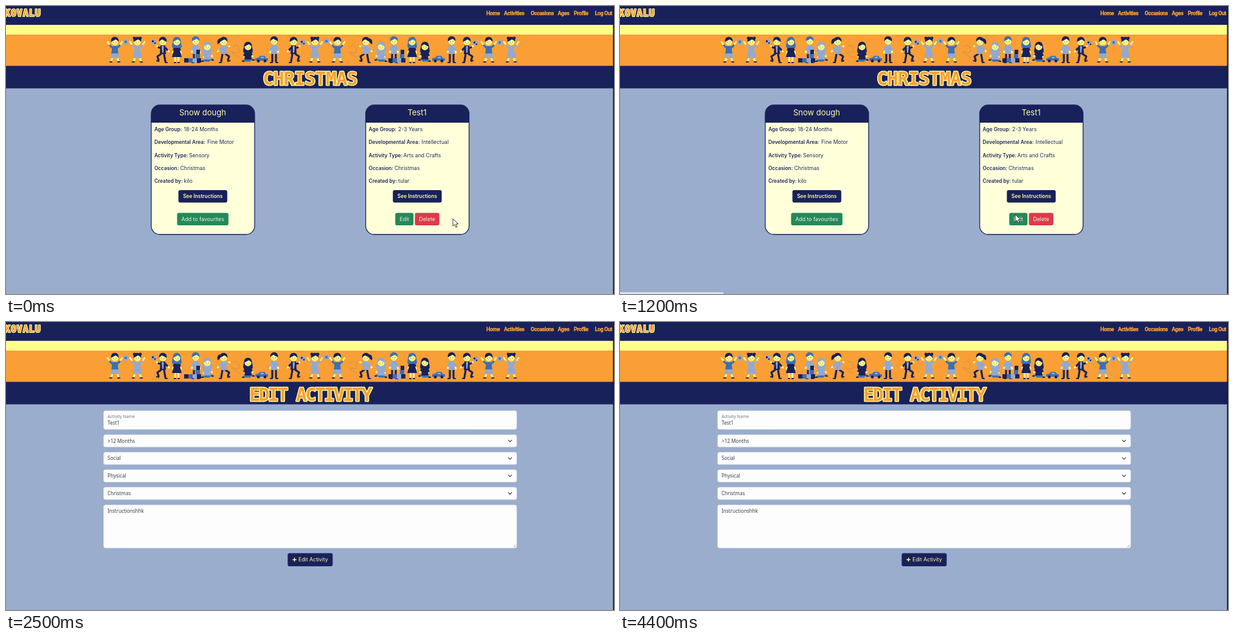
These frames come from a looping animation (1000 px wide and 474 px high, 4.5 s). An HTML page:

```html
<!DOCTYPE html>
<html lang="en">
<head>
<meta charset="utf-8">
<title>Activity editor</title>
<style>
  html, body { margin: 0; width: 100%; height: 100%; overflow: hidden; background: #9aadcd; }
  svg { display: block; width: 100vw; height: 100vh; }
  text { font-family: Inter, sans-serif; font-size: 8.7px; fill: #232a5e; white-space: pre; }
  .b { font-weight: 600; font-size: 8.3px; }
  .y { fill: #ffff9c; }
  .w { fill: #eef3df; }
  .mid { text-anchor: middle; }
  .title { font-size: 13px; }
  .nav { font: 700 8.9px Roboto, sans-serif; letter-spacing: -.4px; fill: #f99f36; stroke: #f99f36; stroke-width: .3; }
  .fancy { font: 700 30px "DejaVu Sans Mono", monospace; fill: #f99f36; stroke: #ffffa0;
    stroke-width: 3; stroke-linejoin: round; paint-order: stroke; }
  .logo { font-size: 15px; stroke-width: 2.2; letter-spacing: .9px; }
  .field { font: 8.1px "Noto Sans", sans-serif; fill: #3b4048; }
  .label { font-size: 7px; fill: #73798a; }
</style>
</head>
<body>
<svg id="stage" viewBox="0 0 1000 474" preserveAspectRatio="none"></svg>
<script>
const NAVY = '#19215b', ORANGE = '#f99f36', YELLOW = '#ffff8c', BLUE = '#3b70b4', PALE = '#91a9d4';
const GREEN = '#26885a', RED = '#dc3b4a';

const rect = (x, y, w, h, fill, r = 0, more = '') =>
  `<rect x="${x}" y="${y}" width="${w}" height="${h}" rx="${r}" fill="${fill}" ${more}/>`;
const text = (x, y, s, cls = '', more = '') => `<text x="${x}" y="${y}" class="${cls}" ${more}>${s}</text>`;
const line = (d, color, w) =>
  `<path d="${d}" fill="none" stroke="${color}" stroke-width="${w}" stroke-linecap="round" stroke-linejoin="round"/>`;
const shape = (d, fill) => `<path d="${d}" fill="${fill}"/>`;
const dot = (x, y, r, fill) => `<circle cx="${x}" cy="${y}" r="${r}" fill="${fill}"/>`;

const poses = {
  up: { arms: 'M-5 69L-12 59M5 69L12 59', sleeves: 'M-4 69L-8 65M4 69L8 65', legs: 'M-3 82L-6 91M3 82L6 91',
    shoes: 'M-8 92H-5M5 92H8', body: 'M-4 66H4L6 79H-6z', skin: true },
  kick: { arms: 'M-4 69L-10 75M4 69L10 66', sleeves: 'M-4 69L-7 72M4 69L7 68', legs: 'M-2 79L-4 91M3 79L9 83L7 89',
    shoes: 'M-7 93H-4M7 91L10 90', body: 'M-4 65H4L5 79H-5z' },
  stand: { arms: 'M-4 68L-7 76L0 75M4 68L7 77', sleeves: 'M-4 68L-6 72M4 68L6 72', legs: 'M-3 79V91M3 79V91',
    shoes: 'M-6 93H-3M3 93H6', body: 'M-4 64H4L5 79H-5z' },
  dress: { arms: 'M-3 69L-7 77M3 69L7 77', sleeves: 'M-3 68L-5 72M3 68L5 72', legs: 'M-2.5 83V91M2.5 83V91',
    shoes: 'M-4 93H-2M2 93H4', body: 'M-3 66H3L8 84H-8z', skin: true },
  sit: { arms: 'M-4 77L-6 84L0 83M4 77L8 83', sleeves: 'M-4 77L-6 81M4 77L6 80', legs: 'M-3 88H8M3 90H-7',
    shoes: 'M8 89H10M-7 91H-9', body: 'M-4 74H4L6 88H-6z' }
};

function kid(x, pose, shirt, girl, flip = 1) {
  const p = poses[pose], sit = pose === 'sit';
  const hair = pose === 'dress' || (pose === 'stand' && x < 700 && x !== 441) ? BLUE : sit && shirt === PALE ? PALE : NAVY;
  const locks = {
    up: dot(-5, 54, 2.4, hair) + dot(5, 54, 2.4, hair),
    kick: shape('M-4 54Q-12 54-10 64Q-6 62-4 58z', hair)
  };
  const long = shape('M-6 57Q-9 68-7 70H7Q9 68 6 57z', hair);
  const back = girl ? locks[pose] || long : '';
  const head = `<g transform="translate(0 ${sit ? 7 : pose === 'stand' ? -2 : -1})">${back}${dot(0, 60, 5.7, YELLOW)}` +
    shape('M-6.2 60C-8 49 8 49 6.2 60Q4 57 1 56Q-4 59-6.2 60z', hair) +
    dot(-2, 60.5, .6, NAVY) + dot(2, 60.5, .6, NAVY) + line('M-1.6 63Q0 64 1.6 63', ORANGE, .7) + '</g>';
  const shorts = pose === 'up' ? shape('M-6 78H6L7 86H2L0 82L-2 86H-7z', shirt === BLUE ? PALE : shirt) : '';
  const tie = shirt === NAVY && pose === 'kick' ? shape('M-1.5 66H2L1 77H-1z', PALE) : '';
  return `<g transform="translate(${x} 0) scale(${flip} 1)">` + line(p.legs, p.skin ? YELLOW : sit ? BLUE : NAVY, 3.2) +
    line(p.shoes, NAVY, 2.2) + line(p.arms, YELLOW, 2.6) + shape(p.body, shirt) + tie + shorts +
    line(p.sleeves, shirt, 3.2) + head + '</g>';
}

const ball = (x, y) => dot(x, y, 4.5, PALE) + dot(x, y, 2, BLUE);
const kickBall = (x, y) => dot(x, y, 4.3, PALE) + dot(x - 1.5, y - 1, 1.7, NAVY) + dot(x + 2, y + 2, 1.3, NAVY);
const hoop = x => line(`M${x - 5} 68Q${x + 2} 60 ${x + 5} 70T${x - 3} 76T${x + 6} 85`, '#b98a4c', .7);
const car = x => shape(`M${x - 10} 90V86L${x - 5} 85L${x - 2} 82H${x + 5}L${x + 8} 86H${x + 11}V90z`, BLUE) +
  rect(x - 1, 83.5, 5, 2.5, PALE) + dot(x - 5, 90.5, 2.4, NAVY) + dot(x + 6, 90.5, 2.4, NAVY);
const blocks = x => rect(x - 14, 86, 7, 7, NAVY) + rect(x - 7, 86, 7, 7, BLUE) + rect(x, 86, 7, 7, PALE) +
  rect(x + 7, 86, 7, 7, NAVY) + rect(x + 5, 79, 7, 7, BLUE) + rect(x + 6, 72, 6, 7, NAVY);

function parade() {
  return kid(179, 'up', BLUE) + ball(197, 59) + kid(216, 'up', PALE, 1) +
    kickBall(243, 59) + kid(258, 'kick', NAVY, 0, -1) + kid(281, 'dress', NAVY, 1) +
    kid(312, 'stand', PALE) + blocks(307) + kid(331, 'sit', PALE, 1) + kid(358, 'kick', PALE, 1) + hoop(378) +
    kid(398, 'sit', NAVY, 1) + car(420) + kid(441, 'stand', PALE, 0, -1) +
    kid(473, 'kick', NAVY) + kickBall(488, 60) + kid(508, 'up', PALE, 1) + ball(527, 58) + kid(545, 'up', BLUE) +
    hoop(571) + kid(592, 'kick', PALE, 1, -1) + kid(617, 'sit', PALE, 1, -1) + kid(638, 'stand', PALE) +
    blocks(643) + kid(668, 'dress', NAVY, 1) + kid(689, 'sit', NAVY, 1, -1) + car(711) + kid(733, 'stand', PALE) +
    kid(758, 'kick', NAVY) + kickBall(772, 61) + kid(794, 'up', BLUE) + ball(812, 60) + kid(831, 'up', PALE, 1);
}

function header() {
  const items = [['Home', 790], ['Activities', 819], ['Occasions', 863], ['Ages', 907.5], ['Profile', 934], ['Log Out', 968.5]];
  return rect(0, 0, 1000, 31, NAVY) + rect(0, 31, 1000, 16, YELLOW) + rect(0, 47, 1000, 52, ORANGE) +
    rect(0, 98.5, 1000, 37, NAVY) + text(-2, 17.3, 'KOVALU', 'fancy logo') +
    items.map(([s, x]) => text(x, 15.2, s, 'nav')).join('') + parade();
}

const heading = (s, gap) => text(500, 130, s, 'fancy mid', `letter-spacing="${gap}"`);

function button(x, y, w, h, fill, label, cls, id = '') {
  return rect(x, y, w, h, fill, 3, id && `id="${id}"`) + text(x + w / 2, y + h / 2 + 3, label, cls + ' mid');
}

function card(x, name, rows, actions) {
  const labels = [['Age Group:', 53.5], ['Developmental Area:', 92], ['Activity Type:', 62], ['Occasion:', 47.5], ['Created by:', 53.5]];
  const body = labels.map(([s, dx], i) => {
    const y = 206 + i * 21.3;
    return text(5, y, s, 'b') + text(dx, y, rows[i]);
  }).join('');
  return `<g transform="translate(${x} 0)">` + rect(0, 163, 170, 213, '#ffffda', 14) +
    shape('M0 192V177A14 14 0 0 1 14 163H156A14 14 0 0 1 170 177V192z', NAVY) +
    rect(0, 163, 170, 213, 'none', 14, `stroke="${NAVY}" stroke-width="1.3"`) +
    text(84.5, 179.5, name, 'title y mid') + body +
    button(44.7, 303, 80.3, 20.5, NAVY, 'See Instructions', 'b y') + actions + '</g>';
}

function listPage() {
  return heading('CHRISTMAS', -.8) +
    card(238.9, 'Snow dough', ['18-24 Months', 'Fine Motor', 'Sensory', 'Christmas', 'kilo'],
      button(42.5, 340.5, 84.5, 20.5, GREEN, 'Add to favourites', 'w')) +
    card(591.6, 'Test1', ['2-3 Years', 'Intellectual', 'Arts and Crafts', 'Christmas', 'tular'],
      button(48.6, 340.5, 30, 20.5, GREEN, 'Edit', 'w', 'edit') +
      button(80.9, 340.5, 40.3, 20.5, RED, 'Delete', 'w', 'del'));
}

function formPage() {
  const box = (y, h) => rect(160.5, y, 679.5, h, '#fdfdfe', 3.2, 'stroke="#d5dbe6" stroke-width=".6"');
  const selects = ['&gt;12 Months', 'Social', 'Physical', 'Christmas'].map((s, i) => {
    const y = 185.5 + i * 28.8;
    return box(y, 20.3) + text(167, y + 13, s, 'field') + line(`M826.2 ${y + 8.8}l2.8 2.8l2.8-2.8`, '#343a40', 1.2);
  }).join('');
  return heading('EDIT ACTIVITY', -2.7) + box(146, 30.8) + text(167, 158, 'Activity Name', 'field label') +
    text(167, 169.3, 'Test1', 'field') + selects + box(301, 71) + text(167, 313.7, 'Instructionshhk', 'field') +
    line('M834.5 370.5L838.5 366.5M837 370.5L838.5 369', '#777', .6) +
    rect(463.3, 380.5, 74, 21.5, NAVY, 3) + line('M471.8 391.2H477.2M474.5 388.5V393.9', YELLOW, 1.4) +
    text(481, 394.2, 'Edit Activity', 'y');
}

const ARROW = '<path d="M0 0V12.2L2.9 9.6L5 14.3L7 13.4L4.9 8.8H8.8z" fill="#fff" stroke="#222" stroke-width=".9"/>';
const HAND = '<path d="M-1.2 1Q0-1 1.2 1V5.5L2.5 4.9L3.6 6L4.9 5.4L5.7 6.6Q7.2 6.2 7.2 7.8V10.5L5.6 14.5H-1.2L-4.8 9.2Q-4.6 7.3-2.9 8.2L-1.2 9.5z" fill="#fff" stroke="#222" stroke-width=".8"/>';
const BEAM = line('M-2 0H2M0 0V12M-2 12H2', '#e2e3e6', .9);

const stage = document.getElementById('stage');
stage.innerHTML = rect(0, 0, 1000, 474, '#9aadcd') + header() +
  `<g id="list">${listPage()}</g><g id="form">${formPage()}</g>` +
  rect(0, 471, 170, 3, '#dde3ec', 0, 'id="status"') + rect(998.4, 0, 1.6, 474, '#11163d') +
  `<g id="arrow">${ARROW}</g><g id="hand">${HAND}</g><g id="beam">${BEAM}</g>`;

const el = id => document.getElementById(id);
const show = (id, on) => el(id).setAttribute('display', on ? 'inline' : 'none');
const place = (id, x, y) => el(id).setAttribute('transform', `translate(${x} ${y})`);
const ease = p => p * p * (3 - 2 * p);
const part = (t, a, b) => ease(Math.min(1, Math.max(0, (t - a) / (b - a))));

const LOOP = 4500, LOADED = 1400;

function draw(t) {
  const form = t >= LOADED, reach = part(t, 0, 500), shift = part(t, 1000, 1150);
  const x = 735 - 80 * reach - 5 * shift, y = 350 - 6 * reach - shift;
  const onEdit = x <= 670 && t < 1100, onDelete = x >= 672.5 && x <= 712.8;
  const pointing = onEdit || onDelete;
  show('list', !form);
  show('form', form);
  show('status', !form && x <= 670);
  show('arrow', !form && !pointing);
  show('hand', !form && pointing);
  show('beam', form && t < 2500);
  place('arrow', x, y);
  place('hand', x, y);
  place('beam', 658.5, 346);
  el('edit').setAttribute('fill', onEdit ? '#21704c' : GREEN);
  el('del').setAttribute('fill', onDelete ? '#bd3140' : RED);
}

function tick(now) {
  draw(Math.floor((now % LOOP) / 100) * 100);
  requestAnimationFrame(tick);
}
draw(0);
requestAnimationFrame(tick);
</script>
</body>
</html>
```
